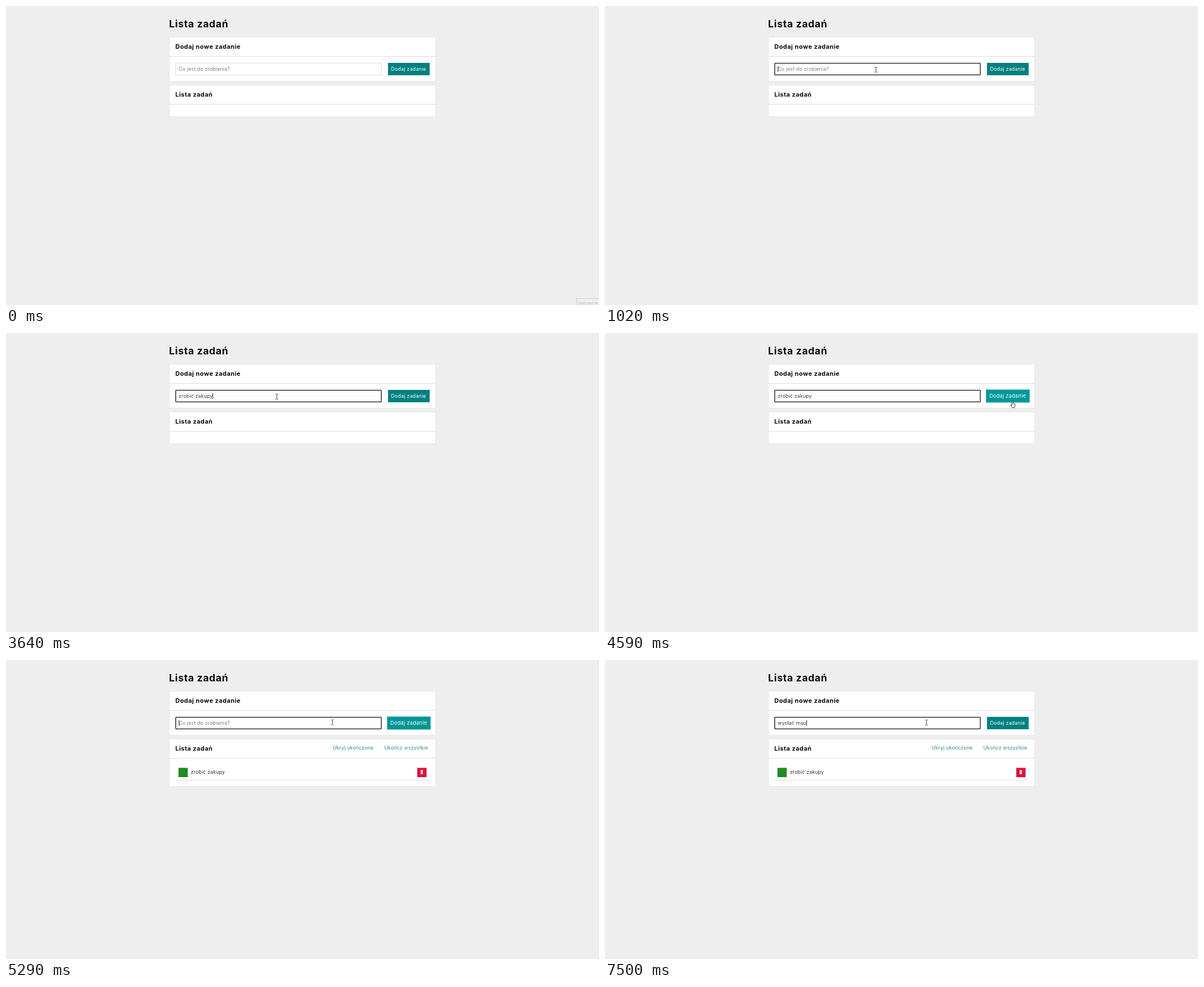
These frames come from a looping animation (1054 by 531 pixels, 8000 ms). An HTML page with a canvas:

```html
<!DOCTYPE html>
<html lang="pl">
<head>
<meta charset="utf-8">
<title>Lista zadań</title>
<style>
  html, body { margin: 0; width: 100%; height: 100%; overflow: hidden; background: #eee; }
  canvas { display: block; width: 1054px; height: 531px; }
</style>
</head>
<body>
<canvas id="stage" width="1054" height="531"></canvas>
<script>
const ctx = document.getElementById('stage').getContext('2d');
const LOOP = 8000, STEP = 70;
const FOCUS = 1020, ADDED = 4800, HOVER_IN = 4290, HOVER_OUT = 5220, HOVER_TIME = 350;
const FIRST_TASK = 'zrobić zakupy';

// Each entry: time of the key press, content of the field afterwards.
const keys = [[FOCUS, '']];
[1540, 1740, 1940, 2070, 2200, 2420, 2550, 2750, 2950, 3090, 3240, 3440, 3640]
  .forEach((time, i) => keys.push([time, FIRST_TASK.slice(0, i + 1)]));
keys.push([ADDED, ''], [5700, 'w'], [5900, 'wy'], [6100, 'wys'], [6300, 'wysł'],
  [6430, 'wysła'], [6560, 'wysłac'], [6890, 'wysła'], [6990, 'wysłać'],
  [7090, 'wysłać '], [7290, 'wysłać m'], [7360, 'wysłać ma'], [7500, 'wysłać mau']);

// Pointer moves along quadratic curves.
const moves = [
  { start: 210, end: 960, from: [997, 520], bend: [690, 300], to: [481.5, 113] },
  { start: 4100, end: 4500, from: [481.5, 113], bend: [603, 55], to: [724, 121] },
  { start: 4940, end: 5430, from: [724, 121], bend: [650, 108], to: [571.5, 111] }
];

const clamp = v => Math.max(0, Math.min(1, v));
const smooth = v => v * v * (3 - 2 * v);
const mix = (a, b, k) => a + (b - a) * k;

function rect(x, y, w, h, color) {
  ctx.fillStyle = color;
  ctx.fillRect(x, y, w, h);
}

function frame(x, y, w, h, color) {
  ctx.strokeStyle = color;
  ctx.lineWidth = 1;
  ctx.strokeRect(x + 0.5, y + 0.5, w - 1, h - 1);
}

function setFont(size, weight = 400, spacing = 0.02, family = 'Inter') {
  ctx.font = `${weight} ${size}px ${family}, sans-serif`;
  ctx.letterSpacing = `${size * spacing}px`;
}

function text(str, x, y, color) {
  ctx.fillStyle = color;
  ctx.fillText(str, x, y);
}

function card(y, h, title) {
  rect(290, y, 474, h, '#fff');
  frame(290, y, 474, h, '#e8e8e8');
  rect(290, y + 34, 474, 1, '#ddd');
  setFont(11, 700, 0.042);
  text(title, 301, y + 20.8, '#0b0b0b');
}

function drawField(t) {
  const focused = t >= FOCUS;
  if (focused) {
    ctx.strokeStyle = '#101010';
    ctx.lineWidth = 1.3;
    ctx.beginPath();
    ctx.roundRect(301.65, 101.65, 365.4, 20.7, 1);
    ctx.stroke();
  } else {
    frame(301, 101, 367, 22, '#ddd');
  }
  const [time, value] = keys.filter(k => k[0] <= t).pop() || [0, ''];
  setFont(8.8);
  text(value || 'Co jest do zrobienia?', 307, 114.8, value ? '#3c3c3c' : '#7c7c7c');
  if (focused && Math.floor((t - time) / 525) % 2 === 0) {
    rect(Math.round(306.8 + ctx.measureText(value).width), 107, 1, 10, '#333');
  }
}

function drawButton(t) {
  const hover = smooth(clamp((t - HOVER_IN) / HOVER_TIME)) - smooth(clamp((t - HOVER_OUT) / HOVER_TIME));
  const scale = 1 + 0.05 * hover;
  const tone = Math.round(mix(128, 153, hover));
  ctx.save();
  ctx.translate(716, 112);
  ctx.scale(scale, scale);
  rect(-37, -11, 74, 22, `rgb(0,${tone},${tone})`);
  setFont(8.8, 400, 0.03);
  text('Dodaj zadanie', -31.6, 2.8, '#fff');
  ctx.restore();
}

function drawTask() {
  setFont(8.8);
  text('Ukryj ukończone', 580.8, 159.2, '#2b8c86');
  text('Ukończ wszystkie', 672.4, 159.2, '#2b8c86');
  rect(306.5, 191.5, 16.5, 16.5, '#228b22');
  text(FIRST_TASK, 328.5, 202.4, '#303030');
  rect(731, 191.5, 16.5, 16.5, '#dc143c');
  rect(736.6, 196, 4.8, 1.2, '#fff');
  rect(738, 195.4, 2, 1, '#fff');
  rect(737.1, 197.6, 3.8, 5, '#fff');
  rect(738.2, 198.2, 0.5, 3.8, '#e0607a');
  rect(739.4, 198.2, 0.5, 3.8, '#e0607a');
  rect(301, 213, 452, 1, '#ddd');
}

function outline(points, fill, stroke) {
  ctx.beginPath();
  points.forEach(([x, y]) => ctx.lineTo(x, y));
  ctx.closePath();
  ctx.lineJoin = 'round';
  ctx.lineWidth = 0.9;
  ctx.fillStyle = fill;
  ctx.strokeStyle = stroke;
  ctx.fill();
  ctx.stroke();
}

const shapes = {
  arrow() {
    outline([[0, 0], [0, 9.4], [2.2, 7.4], [3.7, 10.6], [5.1, 10], [3.7, 6.9], [6.7, 6.7]], '#fff', '#222');
  },
  beam() {
    rect(-0.5, -4, 1, 8, '#444');
    for (const y of [-5, 4]) {
      rect(-2.5, y, 2, 1, '#555');
      rect(0.5, y, 2, 1, '#555');
    }
  },
  hand() {
    outline([[-0.8, 0.3], [0.3, 0], [1, 0.8], [1, 4], [2.2, 3.9], [3.4, 4.5], [4.8, 5], [5, 8.3],
      [3.9, 10.2], [3.9, 11.6], [-0.6, 11.6], [-1, 10.2], [-3, 7.4], [-2.7, 6.4], [-0.8, 7.5]], '#fff', '#28323c');
    rect(1.4, 5, 0.5, 1.8, '#666');
    rect(3, 5.4, 0.5, 1.6, '#666');
  }
};

function pointerAt(t) {
  const move = moves.filter(m => m.start <= t).pop();
  if (!move) return null;
  const elapsed = Math.floor((t - move.start) / STEP + 1) * STEP;
  const k = smooth(clamp(elapsed / (move.end - move.start)));
  return [0, 1].map(i => mix(mix(move.from[i], move.bend[i], k), mix(move.bend[i], move.to[i], k), k));
}

function drawPointer(t) {
  const point = pointerAt(t);
  if (!point) return;
  const [x, y] = point;
  const inRow = y > 100 && y < 124;
  const kind = inRow && x > 300 && x < 668 ? 'beam' : inRow && x > 678 && x < 755 ? 'hand' : 'arrow';
  ctx.save();
  ctx.translate(x, y);
  shapes[kind]();
  ctx.restore();
}

function draw(t) {
  rect(0, 0, 1054, 531, '#eee');
  setFont(17.6, 700, 0.039);
  text('Lista zadań', 289.8, 38.4, '#0b0b14');
  card(55, 79, 'Dodaj nowe zadanie');
  card(140, t < ADDED ? 57 : 85, 'Lista zadań');
  drawField(t);
  drawButton(t);
  if (t >= ADDED) drawTask();
  if (t < 70) {
    frame(1014, 519, 45, 20, '#d2d2d2');
    setFont(6.4, 400, 0, '"Open Sans"');
    text('Nagrywanie', 1017, 530, '#bcbcbc');
  }
  drawPointer(t);
}

function tick() {
  draw(performance.now() % LOOP);
  requestAnimationFrame(tick);
}
tick();
</script>
</body>
</html>
```
